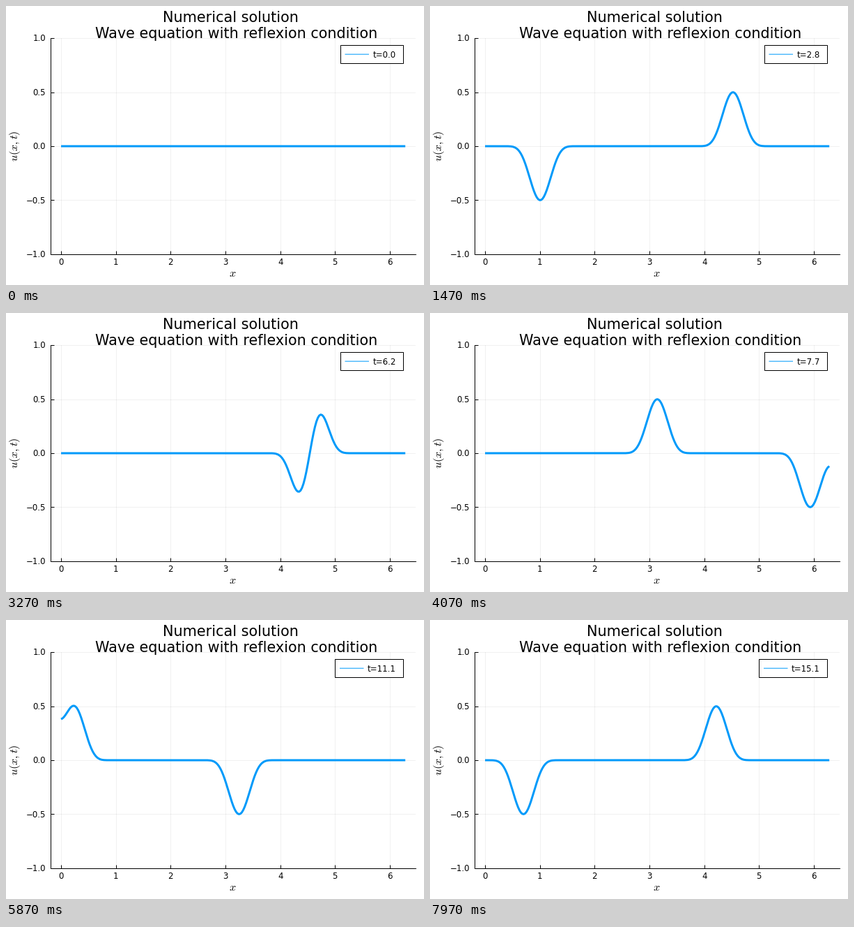
A matplotlib script for the animation above (8000 ms loop, 600 px wide and 400 px high).

```python
import numpy as np
import matplotlib.pyplot as plt
from matplotlib.animation import FuncAnimation
from matplotlib.lines import Line2D
from matplotlib.patches import Rectangle

W, H, DPI = 600, 400, 100
PX = 72 / DPI                    # points per pixel
FRAMES, FPS = 240, 30
L = 2 * np.pi
EDGE = L / 400                   # walls sit half a cell outside [0, L]
SPAN = L + 2 * EDGE
X0, DT, HALF = 1.744, 0.0632, 0.72
BLUE = "#009AFA"
SMALL, BIG, MATH = 11.8 * PX, 20.75 * PX, 16.2 * PX

plt.rcParams.update({"font.family": "DejaVu Sans", "mathtext.fontset": "cm"})
fig = plt.figure(figsize=(W / DPI, H / DPI), dpi=DPI, facecolor="white")


def label(x, y, s, size, **kw):
    return fig.text(x / W, 1 - y / H, s, fontsize=size, color="black", **kw)


def bump(d):
    d = (d + SPAN) % (2 * SPAN) - SPAN
    return np.where(np.abs(d) < HALF, ((1 + np.cos(np.pi * d / HALF)) / 2) ** 3, 0)


def pulse(x, c):
    """Bump centred on c, mirrored at both walls."""
    return bump(x - c) + bump(-x - 2 * EDGE - c)


def wave(x, t):
    return 0.5 * (pulse(x, X0 + t) - pulse(x, X0 - t))


# axes
left, right, top, bottom = 64.25, 588, 46.2, 355.8
ax = fig.add_axes([left / W, 1 - bottom / H, (right - left) / W, (bottom - top) / H])
ax.set_xlim(-0.03 * L, 1.03 * L)
ax.set_ylim(-1, 1)
ax.patch.set_visible(False)
ax.set_axisbelow(True)
ax.grid(color="black", alpha=0.055, lw=PX)
for side in ("top", "right"):
    ax.spines[side].set_visible(False)
for side in ("left", "bottom"):
    ax.spines[side].set_linewidth(PX)
ax.set_xticks(range(7))
ax.set_yticks(np.linspace(-1, 1, 5))
ax.tick_params(direction="in", length=5 * PX, width=PX, labelbottom=False, labelleft=False)

for k in range(7):
    px = left + (k + 0.03 * L) / (1.06 * L) * (right - left)
    label(px, 371, str(k), SMALL, ha="center", va="baseline")
for v in np.linspace(-1, 1, 5):
    py = 201 - 155 * v
    label(57, py + 4.4, f"{v:.1f}".replace("-", "\u2212"), SMALL, ha="right", va="baseline")

# titles
label(224.6, 23.4, "Numerical solution", BIG, va="baseline")
label(127.5, 46.5, "Wave equation with reflexion condition", BIG, va="baseline")
label(325.7, 388, "$x$", MATH, ha="center", va="baseline")
label(13, 201, "$u(x,t)$", MATH, ha="center", va="center", rotation=90)

# curve
xs = np.linspace(0, L, 241)
curve, = ax.plot(xs, 0 * xs, color=BLUE, lw=3 * PX, solid_capstyle="butt",
                 solid_joinstyle="round", snap=False)

# legend
box = Rectangle((0, 1 - 82 / H), 0, 26 / H, transform=fig.transFigure,
                facecolor="white", edgecolor="black", lw=PX, zorder=2)
fig.add_artist(box)
key = Line2D([0, 0], [1 - 69.2 / H] * 2, transform=fig.transFigure, color=BLUE,
             lw=PX, solid_capstyle="butt", snap=False, zorder=3)
fig.add_artist(key)
clock = label(526, 74, "", SMALL, va="baseline", zorder=4)


def draw(n):
    t = DT * n
    curve.set_ydata(wave(xs, t))
    text = f"t={t:.1f}"
    shift = 7.5 * (len(text) - 5)
    box.set_x((479.8 - shift) / W)
    box.set_width((90.6 + shift) / W)
    key.set_xdata([(486.5 - shift) / W, (521 - shift) / W])
    clock.set_x((526.2 - shift) / W)
    clock.set_text(text)
    return curve, box, key, clock


anim = FuncAnimation(fig, draw, frames=FRAMES, interval=1000 / FPS,
                     init_func=lambda: draw(0), repeat=True, repeat_delay=0)
plt.show()
```
